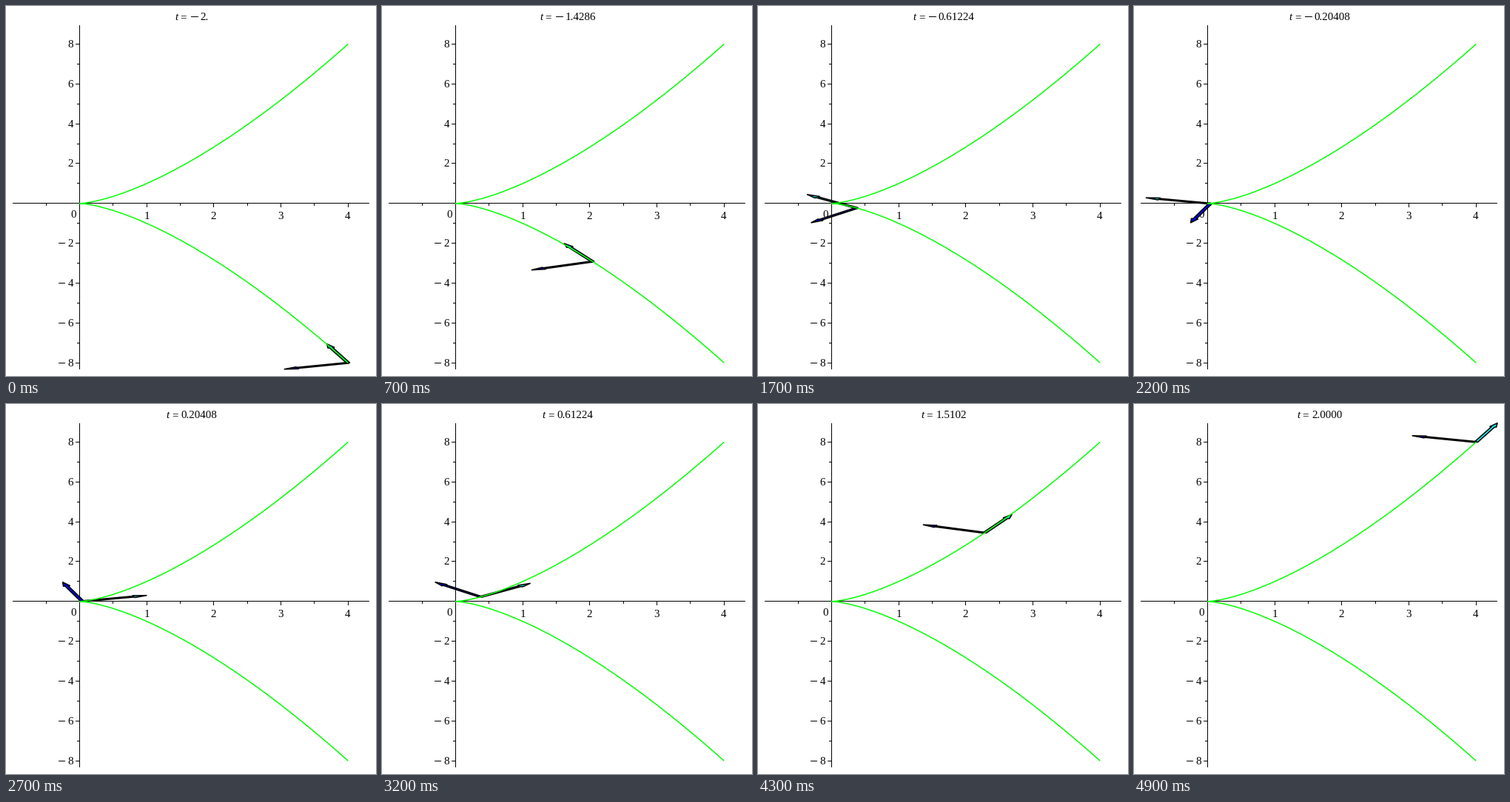
Recreate the animation shown at these times as a matplotlib script. Size 500 by 500 pixels, loop 5000 ms.

```python
import numpy as np
import matplotlib.pyplot as plt
from matplotlib.animation import FuncAnimation
from matplotlib.patches import Polygon

SIZE, DPI, FRAMES = 500, 100, 50
PX = 72 / DPI                        # one pixel in points
ORIGIN = np.array([99.4, 266.8])
SCALE = np.array([90.73, -26.93])    # pixels per unit
FONT_PX = 15
FONT = dict(family="Liberation Serif", size=FONT_PX * PX, color="black")

fig = plt.figure(figsize=(SIZE / DPI, SIZE / DPI), dpi=DPI, facecolor="white")
ax = fig.add_axes([0, 0, 1, 1])
ax.set(xlim=(0, SIZE), ylim=(SIZE, 0))
ax.axis("off")


def to_px(points):
    return ORIGIN + np.asarray(points) * SCALE


def hline(x0, x1, row):
    return ax.plot([x0, x1], [row + .5] * 2, color="black", lw=PX,
                   solid_capstyle="butt", snap=False, zorder=1)[0]


def vline(col, y0, y1):
    return ax.plot([col + .5] * 2, [y0, y1], color="black", lw=PX,
                   solid_capstyle="butt", snap=False, zorder=1)[0]


def label(x, y, text, ha="left", **style):
    return ax.text(x, y, text, ha=ha, va="baseline", zorder=1, **FONT, **style)


def draw_axes():
    ox, oy = np.floor(ORIGIN)
    hline(9, 491, oy)
    vline(ox, 26, 491)
    for k in range(-1, 9):
        col = np.floor(to_px((k / 2, 0))[0])
        vline(col, oy, oy + (4 if k % 2 else 6))
        if k > 0 and k % 2 == 0:
            label(col, 288, str(k // 2), "center")
    for k in range(-8, 9):
        row = np.floor(to_px((0, k))[1])
        hline(ox - (3 if k % 2 else 5), ox, row)
        if k and k % 2 == 0:
            label(91, row + 5, str(abs(k)), "right")
            if k < 0:
                hline(71, 80, row)
    label(91, 286, "0", "center")


def arrow_shape(start, along, across):
    """Outline of a unit arrow: shaft 0.05 wide, head 0.2 long and 0.1 wide."""
    profile = [(0, .025), (.8, .025), (.8, .05), (1, 0),
               (.8, -.05), (.8, -.025), (0, -.025)]
    return to_px([start + a * along + b * across for a, b in profile])


def make_arrow(color, zorder):
    return ax.add_patch(Polygon(np.zeros((3, 2)), facecolor=color,
                                edgecolor="black", lw=1.6 * PX,
                                joinstyle="round", zorder=zorder))


draw_axes()
s = np.linspace(-2, 2, 201)
ax.plot(*to_px(np.column_stack((s**2, s**3))).T, color="#00ff00",
        lw=1.5 * PX, solid_capstyle="butt", zorder=4)
tangent_arrow = make_arrow("#00ffff", 2)
normal_arrow = make_arrow("#0000ff", 3)

BASELINE = 19
name = label(0, BASELINE, "t", style="italic")
equals = label(0, BASELINE, "=")
minus = hline(0, 0, 14)
number = label(0, BASELINE, "")


def set_title(i, t):
    text = "2." if i == 0 else f"{abs(t):#.5g}"
    lead = 34 if t < 0 else 20
    width = lead + FONT_PX * (len(text) / 2 - .25)
    left = 250.8 - width / 2
    name.set_x(left)
    equals.set_x(left + 7.5)
    minus.set_xdata(np.round([left + 21.5, left + 31.5]))
    minus.set_visible(t < 0)
    number.set_text(text)
    number.set_x(left + lead)


def update(i):
    t = -2 + 4 * i / (FRAMES - 1)
    point = np.array([t**2, t**3])
    tangent = np.array([2 * t, 3 * t**2])
    tangent /= np.hypot(*tangent)
    normal = np.array([-tangent[1], tangent[0]])
    tangent_arrow.set_xy(arrow_shape(point, tangent, normal))
    normal_arrow.set_xy(arrow_shape(point, normal, tangent))
    set_title(i, t)
    return tangent_arrow, normal_arrow, name, equals, minus, number


anim = FuncAnimation(fig, update, frames=FRAMES, interval=100,
                     repeat=True, repeat_delay=0)
plt.show()
```
